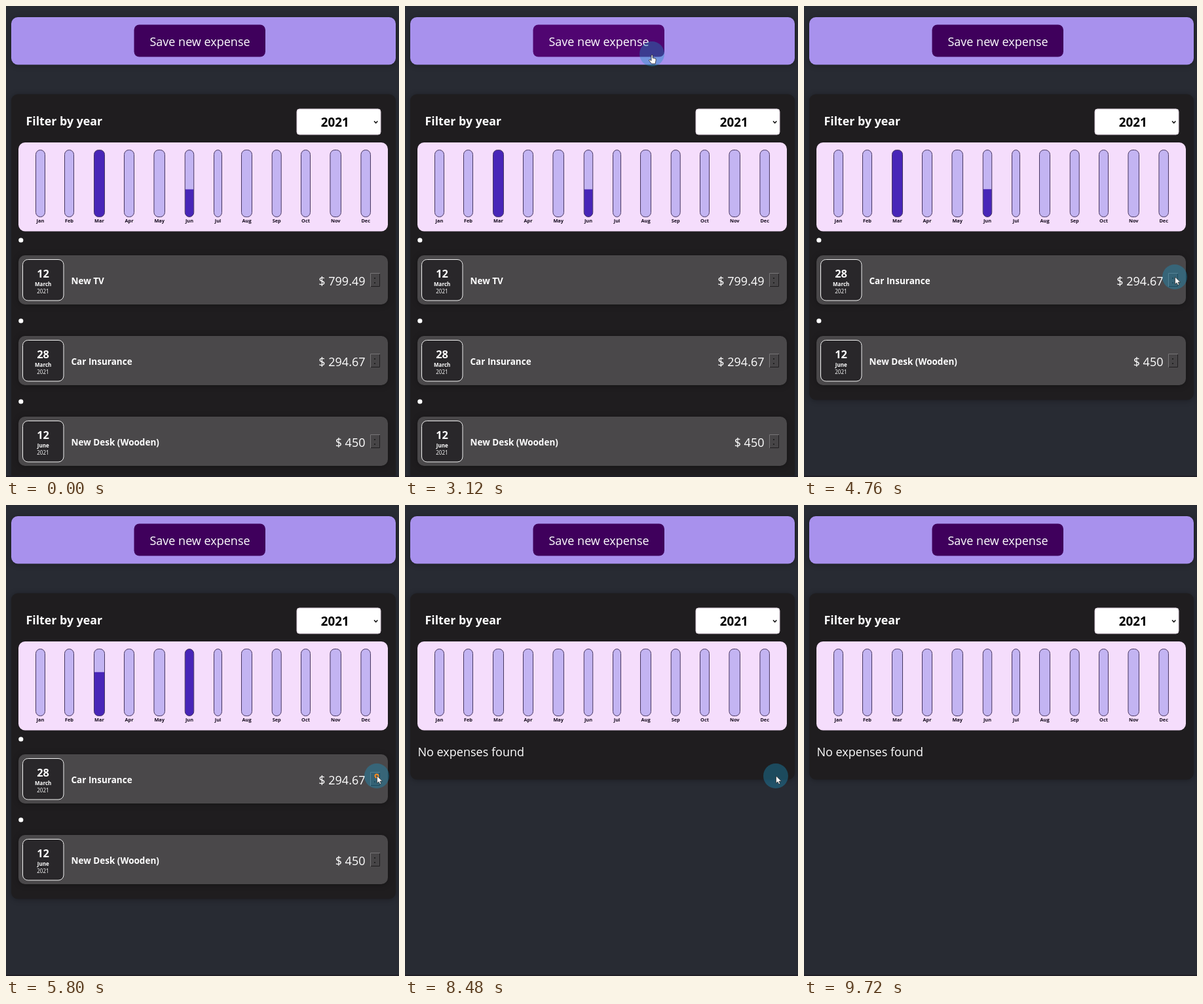
An HTML page that plays this animation: 600 px wide and 718 px high, repeating every 10 s.

```html
<!DOCTYPE html>
<html lang="en">
<head>
<meta charset="utf-8">
<title>Expenses</title>
<style>
  html, body { margin: 0; width: 100%; height: 100%; overflow: hidden; background: #282b33; }
  svg { display: block; width: 600px; height: 718px; font-family: "Open Sans", "Noto Sans", sans-serif; }
  text { fill: #fff; }
  .bold { font-weight: 700; }
  .middle { text-anchor: middle; }
  .end { text-anchor: end; }
  .shadow { filter: drop-shadow(0 1px 4px rgba(0, 0, 0, .3)); }
</style>
</head>
<body>
<svg id="stage" viewBox="0 0 600 718"></svg>
<script>
const LOOP = 10000;
const ROW_PITCH = 123;
const BAR_TIME = 360;

const expenses = [
  { day: 12, month: "March", title: "New TV", amount: 799.49 },
  { day: 28, month: "March", title: "Car Insurance", amount: 294.67 },
  { day: 12, month: "June", title: "New Desk (Wooden)", amount: 450 },
];
const removals = [4760, 6320, 8120];
const clicks = [4120, 5800, 7400];

// label, centre, width
const months = [
  ["Jan", 52.5, 14], ["Feb", 96.5, 14], ["Mar", 142.5, 16], ["Apr", 188, 15],
  ["May", 234.2, 16.5], ["Jun", 280, 13.5], ["Jul", 323.5, 12], ["Aug", 367.5, 16],
  ["Sep", 413.2, 14], ["Oct", 457.5, 14], ["Nov", 503.2, 16.5], ["Dec", 549.2, 14.5],
];

// start, end, from, control point, to
const moves = [
  [40, 880, [560, -12], [500, 50], [377, 73]],
  [3120, 3840, [377, 73], [490, 220], [568, 414]],
  [4120, 4600, [568, 414], [567, 413], [566, 413]],
  [7560, 7920, [566, 413], [550, 413], [566, 413]],
  [8800, 9720, [566, 413], [530, 180], [590, -25]],
];

const rect = (x, y, w, h, r, fill, extra = "") =>
  `<rect x="${x}" y="${y}" width="${w}" height="${h}" rx="${r}" fill="${fill}" ${extra}/>`;
const text = (x, y, size, content, style = "", extra = "") =>
  `<text x="${x}" y="${y}" font-size="${size}" class="${style}" ${extra}>${content}</text>`;

const bar = ([label, centre, width]) => {
  const x = centre - width / 2;
  return rect(x, 219.5, width, 102, 7, "#c3b4f2") +
    rect(x, 219.5, width, 102, 7, "#4825b8", `id="${label}" style="clip-path:inset(100% 0 0 0)"`) +
    rect(x, 219.5, width, 102, 7, "none", 'stroke="#47365f"') +
    text(centre, 330, 7.4, label, "bold middle", 'style="fill:#140a1c"');
};

const row = ({ day, month, title, amount }) => `<g class="row">
  <circle cx="22.8" cy="357" r="3.6" fill="#fff"/>
  ${rect(19, 380, 564, 75, 10, "#4a484a", 'class="shadow"')}
  ${rect(25.5, 386.5, 62.5, 62.5, 8, "#29272a", 'stroke="#f2f2f2"')}
  ${text(56.5, 413.5, 16.4, day, "bold middle")}
  ${text(56.7, 427, 8, month, "bold middle")}
  ${text(56.5, 438, 8.1, 2021, "middle")}
  ${text(99.5, 424, 13.5, title, "bold")}
  ${text(548.5, 425.5, 18, "$ " + amount, "end")}
  ${rect(556, 407, 15, 21, 0, "#474547")}
  <path d="M556.5 428V407.5H571" fill="none" stroke="#777577"/>
  <path d="M570.5 408V427.5H557" fill="none" stroke="#201e20"/>
  <path d="M562 414h2v2h-2zM562 421h2v2h-2z" fill="#222"/>
</g>`;

const stage = document.getElementById("stage");
stage.innerHTML = `
  ${rect(0, 0, 600, 718, 0, "#282b33")}
  ${rect(8, 17, 587, 72.5, 10, "#a891ed", 'class="shadow"')}
  ${rect(195.5, 28.5, 200.5, 49, 8, "#3f005c", 'id="save"')}
  ${text(296, 60.5, 18, "Save new expense", "middle")}
  ${rect(8, 134.5, 587, 600, 10, "#1f1d1f", 'id="panel" class="shadow"')}
  ${text(30.5, 181.5, 17.8, "Filter by year", "bold")}
  ${rect(444, 157, 128, 39, 4, "#fff", 'stroke="#d9ccd9"')}
  ${text(502.3, 184.3, 18.8, 2021, "bold middle", 'style="fill:#000"')}
  <path d="M562 175.5l2.7 2.8 2.7-2.8" fill="none" stroke="#111" stroke-width="1.5"/>
  ${rect(19, 208, 564, 135.5, 10, "#f5ddfc")}
  ${months.map(bar).join("")}
  ${expenses.map(row).join("")}
  ${text(19.5, 383, 18, "No expenses found", "", 'id="empty"')}
  ${rect(0, 716, 600, 2, 0, "#201f27")}
  <g id="cursor">
    <circle r="19" fill="rgba(25,148,195,.38)"/>
    <circle id="ripple" fill="none" stroke="#f58a1f" stroke-width="2"/>
    <path id="arrow" d="M.5 0V11.2L3 8.8 4.8 12.6 6.7 11.7 5 8.1H8.6Z" fill="#fff" stroke="#222" stroke-width=".7"/>
    <path id="hand" d="M-1 2.2Q0 .6 1.2 2.2V6.2L5 7Q6.4 7.4 6.2 9L5.2 15H-.6L-4.6 10Q-4.4 8.4-2.8 9L-1 10.4Z"
      fill="#fff" stroke="#222" stroke-width=".8"/>
  </g>`;

const part = id => document.getElementById(id);
const rows = [...stage.querySelectorAll(".row")];
const show = (element, visible) => element.style.display = visible ? "" : "none";
const clamp = v => Math.min(1, Math.max(0, v));
const smooth = v => v * v * (3 - 2 * v);
const easeOut = v => 1 - (1 - v) ** 1.7;

function share(month, removed) {
  const sum = name => expenses.slice(removed)
    .reduce((total, e) => total + (!name || e.month === name ? e.amount : 0), 0);
  const highest = Math.max(sum("March"), sum("June"));
  // The chart scales to the overall total while a March item shares it with the first one.
  return highest ? sum(month) / highest : 0;
}

function drawBars(t, removed) {
  const progress = removed ? easeOut(clamp((t - removals[removed - 1]) / BAR_TIME)) : 1;
  for (const month of ["March", "June"]) {
    const to = share(month, removed);
    const from = removed ? share(month, removed - 1) : to;
    const height = from + (to - from) * progress;
    part(month.slice(0, 3)).style.clipPath = `inset(${(1 - height) * 100}% 0 0 0)`;
  }
}

function drawCursor(t) {
  const visible = t >= moves[0][0] && t < moves.at(-1)[1];
  show(part("cursor"), visible);
  const [start, end, from, control, to] = moves.findLast(m => t >= m[0]) || moves[0];
  const k = smooth(clamp((t - start) / (end - start)));
  const [x, y] = [0, 1].map(i =>
    (1 - k) ** 2 * from[i] + 2 * k * (1 - k) * control[i] + k * k * to[i]);
  part("cursor").setAttribute("transform", `translate(${x} ${y})`);

  const overSave = visible && x > 195 && x < 396 && y > 28 && y < 78;
  part("save").setAttribute("fill", overSave ? "#500571" : "#3f005c");
  show(part("hand"), overSave);
  show(part("arrow"), !overSave);

  const age = (t - (clicks.findLast(c => t >= c) ?? -LOOP)) / 480;
  show(part("ripple"), age < 1);
  part("ripple").setAttribute("r", 2.5 + 14.5 * clamp(age));
  part("ripple").setAttribute("opacity", 1 - clamp(age));
}

function draw(t) {
  const removed = removals.filter(time => t >= time).length;
  const left = expenses.length - removed;
  rows.forEach((element, i) => {
    show(element, i >= removed);
    element.setAttribute("transform", `translate(0 ${(i - removed) * ROW_PITCH})`);
  });
  show(part("empty"), !left);
  part("panel").setAttribute("height", left ? 343 + (left - 1) * ROW_PITCH : 284);
  drawBars(t, removed);
  drawCursor(t);
}

function tick() {
  draw(performance.now() % LOOP);
  requestAnimationFrame(tick);
}
tick();
</script>
</body>
</html>
```
